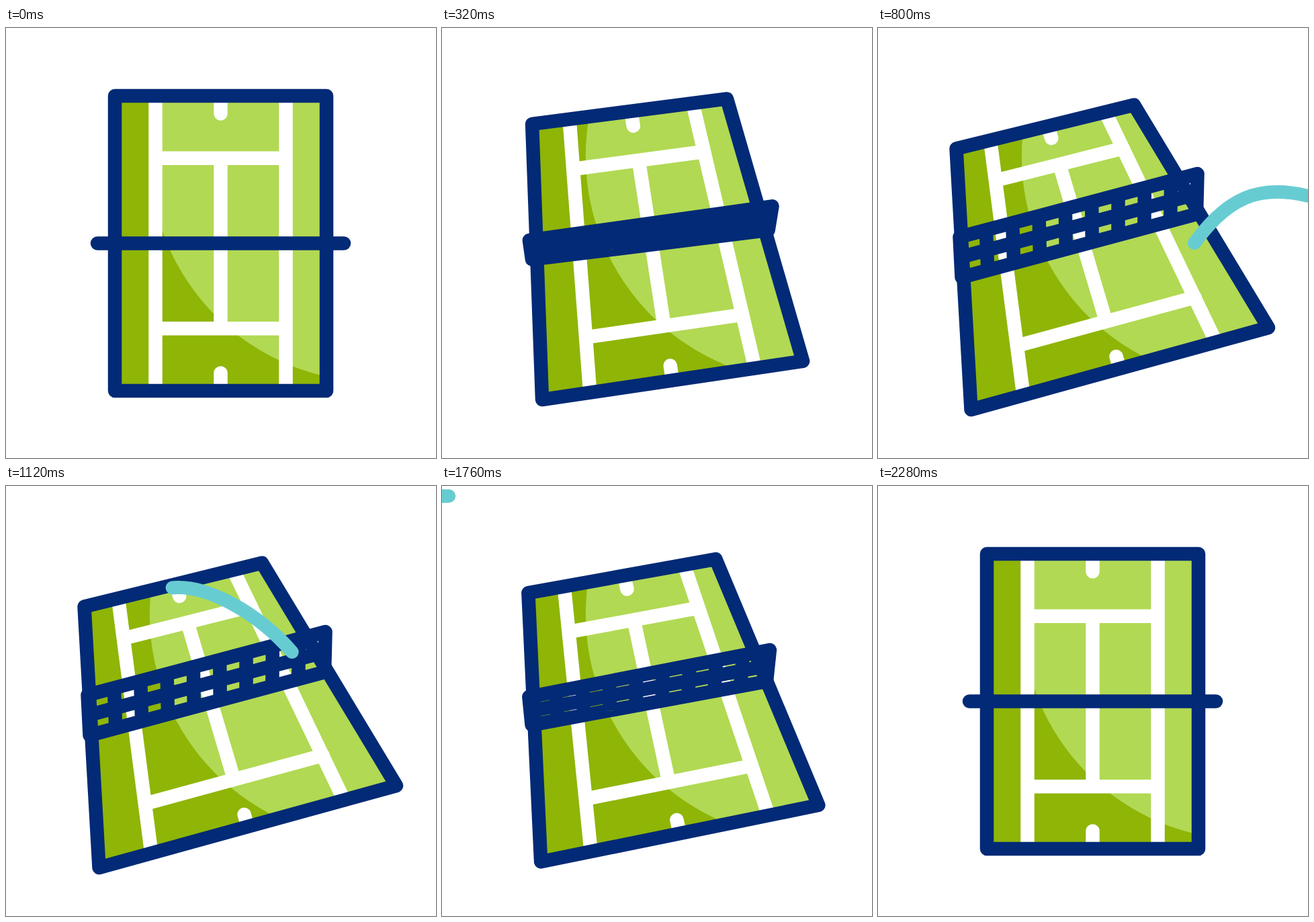
An HTML page for the animation above (2.48 s loop, 640 px wide and 640 px high).

```html
<!DOCTYPE html>
<html lang="en">
<head>
<meta charset="utf-8">
<title>Tennis court</title>
<style>
  html, body { margin: 0; height: 100%; overflow: hidden; background: #fff; }
  svg { display: block; width: 100vw; height: 100vh; }
  path { fill: none; stroke-width: 20.5; stroke-linejoin: round; }
  #lines { stroke: #fff; stroke-linecap: round; }
  #frame, #net { stroke: #032a76; }
  #ball { stroke: #67ccd2; stroke-width: 20; stroke-linecap: round; }
</style>
</head>
<body>
<svg viewBox="0 0 640 640">
  <clipPath id="clip"><path id="area"/></clipPath>
  <g clip-path="url(#clip)">
    <rect width="640" height="640" fill="#8fb507"/>
    <circle cx="549.5" cy="191" r="335.7" fill="#b1d953"/>
    <path id="lines"/>
  </g>
  <path id="frame"/>
  <path id="net"/>
  <path id="ball"/>
</svg>
<script>
const LOOP = 2480, STEP = 40;
const RISE_END = 600, FALL_START = 1640, FALL_END = 2200;
const SWAY = 1.85; // sideways drift: left while tilting, right while returning
const NET_CELLS = 9;
const el = id => document.getElementById(id);

// Corners run clockwise from top left; bow is how far each path bends midway.
const box = (l, t, r, b) => [[l, t], [r, t], [r, b], [l, b]];
const court = {
  flat: box(162, 101, 477, 540),
  tilted: [[116.5, 179.5], [381, 114.5], [581, 446], [138.5, 568]],
  bow: [[-1.8, 0], [0, -2.8], [6.5, 6], [1.4, -1.9]]
};
const net = {
  flat: box(136, 320.5, 503, 320.5),
  tilted: [[121.5, 311], [475.5, 217], [474, 277], [124.5, 371]],
  bow: [[3.5, 0.5], [5, 0], [0, 3.5], [6, -3]]
};

// Ball flight: in from the right, over the net, out at the top left.
const flight = [
  "M700 270C590 225 532 236 471 320",
  "C420 190 225 90 193 195",
  "C170 95 135 40 62 20C45 15.5 25 15 9 15L-40 15"
];
const ball = el("ball");
const [bounce1, bounce2, flightEnd] = flight.map((_, i) => {
  ball.setAttribute("d", flight.slice(0, i + 1).join(""));
  return ball.getTotalLength();
});

const clamp = (v, lo, hi) => Math.min(hi, Math.max(lo, v));
const lerp = (a, b, k) => a + (b - a) * k;
const mix = (a, b, k) => [lerp(a[0], b[0], k), lerp(a[1], b[1], k)];
const poly = pts => "M" + pts.map(p => p.map(v => v.toFixed(2)).join(" ")).join("L");
const draw = (id, d) => el(id).setAttribute("d", d);

// Point inside a quad, u across and v down.
const inside = ([tl, tr, br, bl], u, v) => mix(mix(tl, tr, u), mix(bl, br, u), v);

function tiltAt(t) {
  if (t < FALL_START) return Math.min(1, t / RISE_END);
  const u = Math.min(1, (t - FALL_START) / (FALL_END - FALL_START));
  return (1 - u) ** 1.25;
}

function drawCourt(quad, p) {
  const at = (u, v) => inside(quad, u + 0.015 * p * (1 - v), v);
  const line = (u0, v0, u1, v1) => poly([at(u0, v0), at(u1, v1)]);
  const side = lerp(0.308, 0.324, p);
  const left = 0.5 - side, right = 0.5 + side;
  const far = lerp(0.211, 0.158, p), near = lerp(0.789, 0.806, p);
  const mark = lerp(0.0604, 0.05, p);
  const edge = poly(quad) + "Z";
  draw("area", edge);
  draw("frame", edge);
  draw("lines", [
    ...[left, right].map(u => line(u, 0, u, 1)),
    ...[far, near].map(v => line(left, v, right, v)),
    line(0.5, far, 0.5, near),
    line(0.5, 0, 0.5, mark),
    line(0.5, 1, 0.5, 1 - mark)
  ].join(""));
}

function drawNet(quad) {
  const at = (u, v) => inside(quad, u, v);
  let d = poly(quad) + "Z" + poly([at(0, 0.5), at(1, 0.5)]);
  for (let i = 1; i < NET_CELLS; i++) {
    const u = i / NET_CELLS;
    d += poly([at(u, 0), at(u, 1)]);
  }
  draw("net", d);
}

function drawBall(t) {
  const head = clamp(bounce1 + 0.92 * (t - 800), 0, flightEnd);
  const tail = clamp(bounce2 + 0.885 * (t - 1440), 0, flightEnd);
  ball.style.display = head > tail ? "" : "none";
  ball.style.strokeDasharray = `${head - tail} 3000`;
  ball.style.strokeDashoffset = -tail;
}

function render(t) {
  const p = tiltAt(t);
  const arc = 4 * p * (1 - p);
  const sway = t < FALL_START ? -SWAY : SWAY;
  const pose = ({ flat, tilted, bow }) => flat.map((from, i) => {
    const [x, y] = mix(from, tilted[i], p);
    return [x + (bow[i][0] + sway) * arc, y + bow[i][1] * arc];
  });
  drawCourt(pose(court), p);
  drawNet(pose(net));
  drawBall(t);
}

const start = performance.now();
function tick() {
  const t = (performance.now() - start) % LOOP;
  render(Math.floor(t / STEP) * STEP);
  requestAnimationFrame(tick);
}
tick();
</script>
</body>
</html>
```
